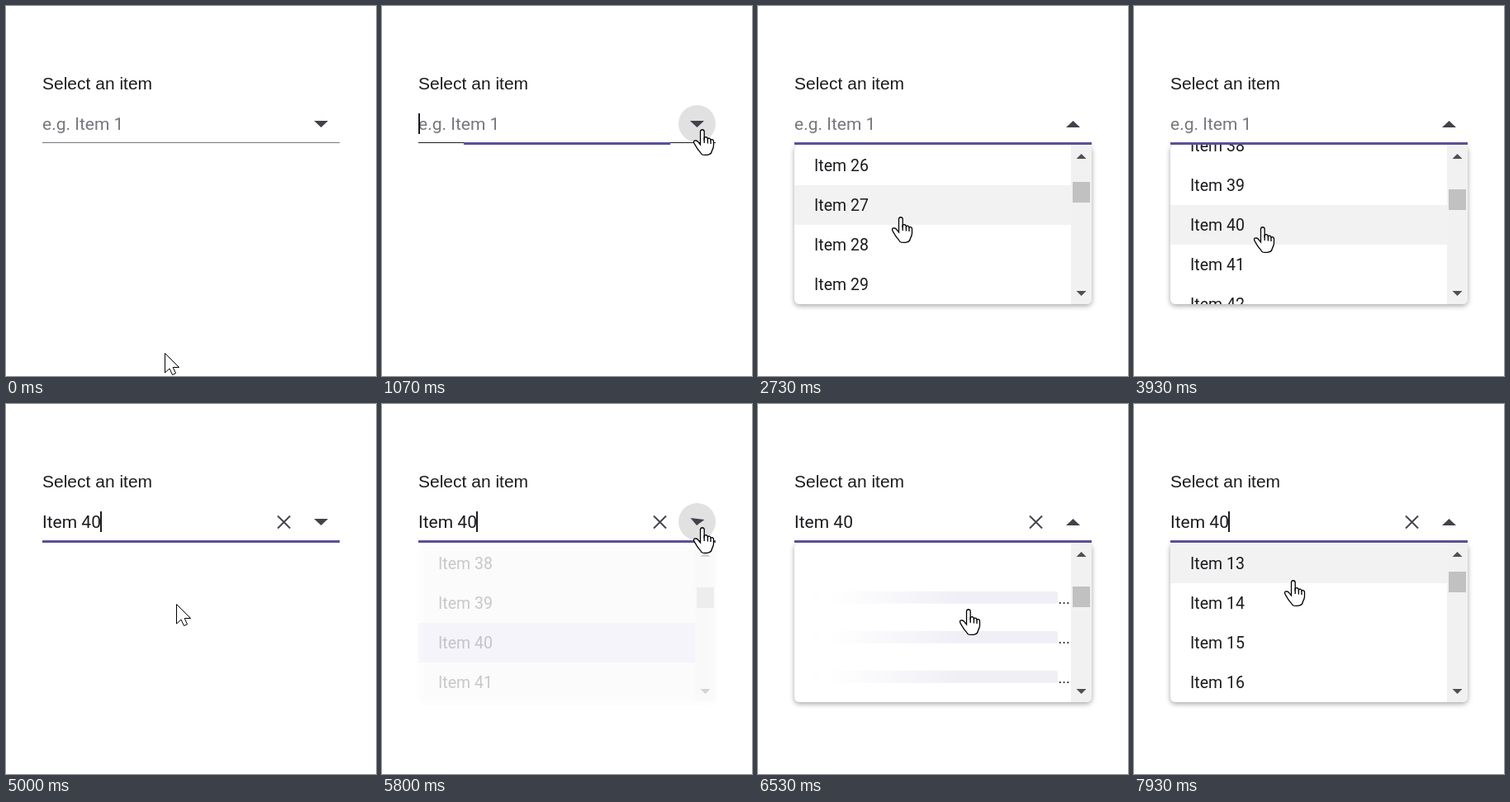
An HTML page with a canvas that plays this animation: 448x448 px, repeating every 8000 ms.

```html
<!DOCTYPE html>
<html lang="en">
<head>
<meta charset="utf-8">
<title>Combo box</title>
<style>
html, body { margin: 0; width: 100%; height: 100%; overflow: hidden; background: #fff; }
canvas { display: block; width: 448px; height: 448px; }
</style>
</head>
<body>
<canvas id="stage"></canvas>
<script>
const canvas = document.getElementById('stage');
const ctx = canvas.getContext('2d');
const dpr = window.devicePixelRatio || 1;
canvas.width = canvas.height = 448 * dpr;

const LOOP = 8000, FPS = 15;
const ROW = 48, TOP = 169, BOTTOM = 361, LEFT = 44, RIGHT = 404, BAR = 379;
const FOCUS = 1000, OPEN1 = 1100, PICK = 4660, OPEN2 = 5766;
const INK = '#1c1b1f', ICON = '#45414a', PURPLE = '#5d4f96';
const ROBOTO = 'Roboto, sans-serif';

// [time, x, y] of the pointer's hot spot
const POINTER = [
  [0, 192, 420], [730, 388, 149], [1330, 388, 149], [1800, 196, 239],
  [1930, 196, 239], [2730, 173, 255], [3270, 173, 255], [3930, 156, 267],
  [4800, 156, 267], [5470, 388, 149], [5930, 388, 149], [6330, 255, 248],
  [6530, 255, 248], [7000, 238, 239], [7330, 207, 222], [7470, 196, 215],
  [7720, 196, 215], [7730, 193, 213], [8000, 193, 213]
];
// [start, end, from, to, time the rows are loaded]
const SCROLLS = [
  [1870, 2400, 0, 1200, 2600],
  [3210, 3530, 1200, 1800, 3660],
  [6475, 7000, 1776, 576, 7260]
];

const clamp = v => Math.max(0, Math.min(1, v));
const smooth = v => { v = clamp(v); return v * v * (3 - 2 * v); };

function pointerAt(t) {
  const i = Math.max(1, POINTER.findIndex(k => k[0] > t));
  const [t0, x0, y0] = POINTER[i - 1], [t1, x1, y1] = POINTER[i];
  const p = smooth((t - t0) / (t1 - t0));
  return { x: x0 + (x1 - x0) * p, y: y0 + (y1 - y0) * p };
}

function scrollAt(t) {
  if (t >= PICK + 200 && t < SCROLLS[2][0]) return { top: 1776, since: -1 };
  let top = 0, since = -1;
  for (const [start, end, from, to, loaded] of SCROLLS) {
    if (t < start) break;
    top = from + (to - from) * smooth((t - start) / (end - start));
    since = t < loaded ? t - start : -1;
  }
  return { top, since };
}

function popupAlpha(t) {
  if (t < PICK) return clamp((t - OPEN1) / 150);
  if (t < OPEN2) return clamp(1 - (t - PICK) / 150);
  return clamp((t - OPEN2) / 150);
}

function arrowTurn(t) {
  if (t < PICK) return smooth((t - OPEN1) / 300);
  if (t < OPEN2) return 1 - smooth((t - PICK) / 300);
  return smooth((t - OPEN2) / 300);
}

function rect(x, y, w, h, color) {
  ctx.fillStyle = color;
  ctx.fillRect(x, y, w, h);
}

function text(str, x, y, size, color, family = ROBOTO) {
  ctx.font = size + 'px ' + family;
  ctx.fillStyle = color;
  ctx.fillText(str, x, y);
}

function triangle(x, y, w, h, angle, color) {
  ctx.save();
  ctx.translate(x, y);
  ctx.rotate(angle);
  ctx.beginPath();
  ctx.moveTo(-w / 2, -h / 2);
  ctx.lineTo(w / 2, -h / 2);
  ctx.lineTo(0, h / 2);
  ctx.fillStyle = color;
  ctx.fill();
  ctx.restore();
}

function roundBox(x, y, w, h, r) {
  ctx.beginPath();
  ctx.roundRect(x, y, w, h, r);
}

function skeleton(y, since) {
  const c = 75 + since * 0.3;
  const g = ctx.createLinearGradient(c - 150, 0, c + 150, 0);
  g.addColorStop(0, '#f0eff6');
  g.addColorStop(0.45, '#ffffff');
  g.addColorStop(0.58, '#fcfcfd');
  g.addColorStop(1, '#f0eff6');
  roundBox(68, y - 7.5, 295, 15, 3);
  ctx.fillStyle = g;
  ctx.fill();
  text('...', 363.5, y + 8, 18, INK);
}

function drawRows(t, scroll, p) {
  const first = Math.floor(scroll.top / ROW);
  for (let i = first; i < first + 5; i++) {
    const y = TOP + i * ROW - scroll.top;
    if (scroll.since >= 0) {
      const pending = t > OPEN2 && t < 6600 && i < 37;
      if (!pending) skeleton(y + 13 + 11, scroll.since);
      continue;
    }
    const hover = p.x > LEFT && p.x < BAR && p.y >= TOP && p.y >= y && p.y < y + ROW;
    let fill = null;
    if (i === 39 && t >= PICK) fill = '#e1dcf3';
    else if (hover) fill = '#f2f2f2';
    else if (i === 0 && t < PICK) fill = '#f5f5f5';
    if (fill) rect(LEFT, y, BAR - LEFT, ROW, fill);
    text('Item ' + (i + 1), 68, y + 31, 19.5, INK);
  }
}

function drawPopup(t, p) {
  const alpha = popupAlpha(t);
  if (!alpha) return;
  const scroll = scrollAt(t);
  ctx.save();
  ctx.globalAlpha = alpha;
  ctx.save();
  ctx.shadowColor = 'rgba(0,0,0,' + 0.36 * alpha + ')';
  ctx.shadowBlur = 6 * dpr;
  ctx.shadowOffsetY = 2 * dpr;
  roundBox(LEFT, 168, RIGHT - LEFT, BOTTOM - 168, 6);
  ctx.fillStyle = '#fff';
  ctx.fill();
  ctx.restore();
  roundBox(LEFT, 168, RIGHT - LEFT, BOTTOM - 168, 6);
  ctx.clip();
  drawRows(t, scroll, p);
  rect(BAR, 168, RIGHT - BAR, BOTTOM - 168, '#f1f1f1');
  rect(381, Math.round(194 + scroll.top * 0.0156), 21, 25, '#c1c1c1');
  triangle(391.5, 182, 12, 6, Math.PI, scroll.top > 0 ? '#505050' : '#a3a3a3');
  triangle(391.5, 348, 12, 6, 0, '#505050');
  ctx.restore();
}

function drawField(t, onButton) {
  const picked = t >= PICK;
  text('Select an item', LEFT, 101, 21, INK, '"Liberation Sans", Arial, sans-serif');
  text(picked ? 'Item 40' : 'e.g. Item 1', LEFT, 150, 21, picked ? INK : '#79757d');

  if (onButton) {
    ctx.beginPath();
    ctx.arc(381.5, 142.5, 22.5, 0, 7);
    ctx.fillStyle = '#e1e1e1';
    ctx.fill();
  }
  triangle(381.5, 143, 17, 8, arrowTurn(t) * Math.PI, ICON);

  if (picked) {
    ctx.beginPath();
    ctx.moveTo(329, 135.5);
    ctx.lineTo(344, 150.5);
    ctx.moveTo(344, 135.5);
    ctx.lineTo(329, 150.5);
    ctx.strokeStyle = ICON;
    ctx.lineWidth = 1.9;
    ctx.stroke();
  }

  rect(LEFT, 165, RIGHT - LEFT, 1, onButton ? INK : '#79757d');
  const half = 180 * smooth((t - FOCUS + 60) / 200);
  if (t >= FOCUS - 1) rect(224 - half, 165, half * 2, 3, PURPLE);

  const start = picked ? 4733 : FOCUS;
  const blink = Math.floor((t - start) / (8000 / 15) + 0.01);
  if (blink >= 0 && blink % 2 === 0) rect(picked ? 114 : 44, 130, 2, 25, INK);
}

const arrowPath = new Path2D('M.5 .5V24L6 19L9.5 26.5L13.5 24.8L10.2 17.5H17.5Z');
const handPath = new Path2D(
  'M-2.5 19V3C-2.5 0 2.2 0 2.2 3V11C3 9 6.2 9.3 6.4 12C7.5 10.5 9.8 11 10 13.2' +
  'C11.5 12 13.5 13 13.5 15V20C13.5 24 11 26 11 28C10 32 1 32 -1 30.5' +
  'C-3 27 -6 25 -7.5 21.5C-9 18.5 -11 17 -10.5 15C-9.5 13 -6 14 -5 16Z');
const knuckles = new Path2D('M2.2 10V17M6.4 12V17.5M10 13.2V18');

function drawPointer(p, hand) {
  ctx.save();
  ctx.translate(Math.round(p.x), Math.round(p.y));
  ctx.fillStyle = '#fff';
  ctx.strokeStyle = '#000';
  ctx.lineWidth = hand ? 1.3 : 1;
  const shape = hand ? handPath : arrowPath;
  ctx.fill(shape);
  ctx.stroke(shape);
  if (hand) ctx.stroke(knuckles);
  ctx.restore();
}

function draw(now) {
  const t = Math.floor((now % LOOP + 7) * FPS / 1000) * 1000 / FPS % LOOP;
  const p = pointerAt(t);
  const onButton = Math.hypot(p.x - 381.5, p.y - 142.5) < 23;
  const overList = popupAlpha(t) > 0 && p.y > TOP && p.y < BOTTOM && p.x > LEFT && p.x < BAR;
  ctx.setTransform(dpr, 0, 0, dpr, 0, 0);
  rect(0, 0, 448, 448, '#fff');
  drawPopup(t, p);
  drawField(t, onButton);
  drawPointer(p, onButton || overList);
}

const origin = performance.now();
function tick() {
  draw(performance.now() - origin);
  requestAnimationFrame(tick);
}
tick();
</script>
</body>
</html>
```
